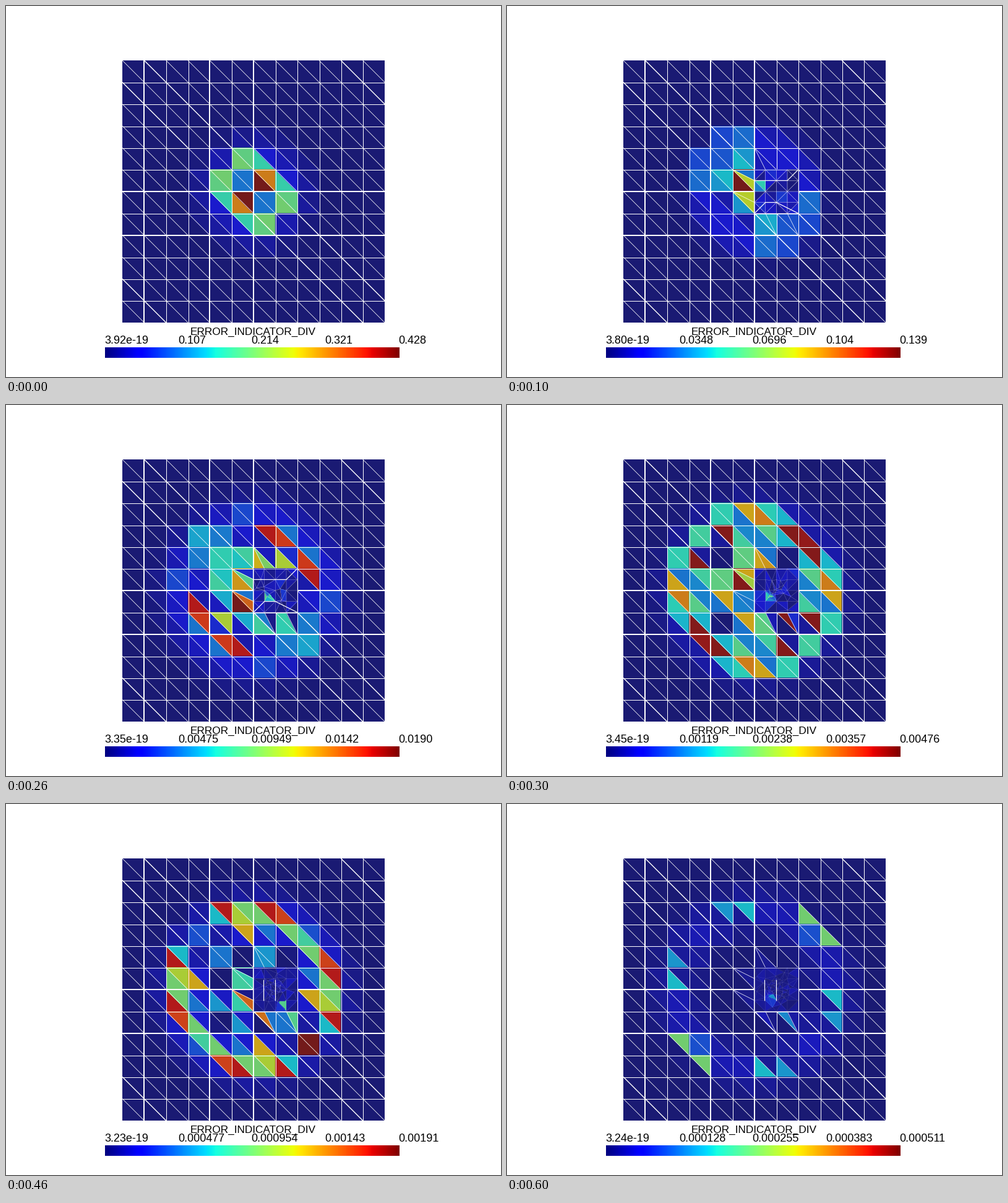
A matplotlib script that plays this animation: 800 by 600 pixels, repeating every 0.7 s.

```python
import numpy as np
import matplotlib.pyplot as plt
from matplotlib.animation import ArtistAnimation
from matplotlib.collections import LineCollection, PolyCollection
from matplotlib.tri import Triangulation

N, X0, Y0, CELL = 12, 188, 88, 424 / 12
JET = plt.get_cmap("jet")

fig = plt.figure(figsize=(8, 6), dpi=100, facecolor="white")
ax = fig.add_axes([0, 0, 1, 1])


def px(points):
    """Mesh units (column, row) to stage pixels."""
    return np.asarray(points, float) * CELL + (X0, Y0)


def faces(polys, percent, z):
    """Flat polygons in jet colours, dulled by the surface lighting."""
    rgb = 0.1 + 0.7 * JET(np.asarray(percent, float) / 100)[:, :3]
    return ax.add_collection(PolyCollection(
        [px(p) for p in polys], facecolors=rgb, edgecolors="none",
        antialiaseds=False, zorder=z))


def lines(segs, width, z, alpha=1):
    return ax.add_collection(LineCollection(
        segs, colors="white", linewidths=width * 0.72, alpha=alpha,
        capstyle="butt", zorder=z))


def label(x, y, text, size, **kw):
    return ax.text(x, y, text, fontsize=size * 0.72, family="Liberation Sans",
                   color="black", va="baseline", **kw)


def halves(x, y):
    """Lower left and upper right triangle of a cell."""
    return [[(x, y), (x, y + 1), (x + 1, y + 1)],
            [(x, y), (x + 1, y + 1), (x + 1, y)]]


CELLS = [t for r in range(N) for c in range(N) for t in halves(c, r)]
DIST = np.hypot(*(np.mean(CELLS, axis=1) - N / 2).T).reshape(N, N, 2)


def field(radius, width, level, peaks):
    """A ring of low error plus peaks repeated by the mesh symmetry."""
    grid = level * np.exp(-((DIST - radius) / width) ** 2)
    m = N - 1
    for (r, c), pair in peaks.items():
        for s, v in enumerate(np.broadcast_to(pair, 2)):
            grid[r, c, s] = grid[m - c, m - r, s] = v
            grid[m - r, m - c, 1 - s] = grid[c, r, 1 - s] = v
    return grid.ravel()


def fan(apex, start, mid, end):
    """A triangle split at the middle of one edge."""
    return [[apex, start, mid], [apex, mid, end]]


# Cells next to the refined block are halved where its edges are halved
FANS = (fan((6, 4), (6, 5), (6.5, 5), (7, 5))
        + fan((5, 5), (6, 5), (6, 5.5), (6, 6))
        + fan((5, 6), (6, 6), (6, 6.5), (6, 7))
        + fan((7, 8), (6, 7), (6.5, 7), (7, 7))
        + fan((8, 8), (7, 7), (7.5, 7), (8, 7)))
CORNER = [(8, 8), (9, 8), (9, 9), (8, 9)]
BORDER = px([(6, 5), (8, 5), (8, 7), (6, 7), (6, 5)])
RIDGES = [px([(6, 5.5), (7.5, 5.5), (8, 5)]),
          px([(6, 7), (6.5, 6.5), (7, 6.5), (8, 7)])]
POSTS = [px([(x, 5.55), (x, 6.5)]) for x in (6.45, 7)]


def block(extra, top, hot):
    """Refined centre: a lattice with extra nodes and one hot spot."""
    rng = np.random.default_rng(extra)
    t = np.linspace(0, 2, 5)
    nodes = [(6 + a, 5 + b) for a in t for b in t]
    core = rng.normal((6.95, 5.95), 0.35, (extra, 2))
    pts = np.vstack([nodes, core.clip((6.1, 5.1), (7.9, 6.9))])
    polys = pts[Triangulation(*pts.T).triangles]
    x, y, peak = hot
    mid = polys.mean(axis=1)
    near = np.exp(-((mid[:, 0] - x) ** 2 + (mid[:, 1] - y) ** 2) / 0.03)
    return polys, 1 + top * rng.random(len(polys)) ** 1.5 + peak * near


shots = []


def shot(low, high, ring, peaks, sides=None, mesh=None, strokes=()):
    art = [faces(CELLS, field(*ring, peaks), 1)]
    if sides:
        art.append(faces(FANS + [CORNER], sides, 2))
        art.append(lines([px([p[0], p[2]]) for p in FANS[::2]], 0.7, 4))
    if mesh:
        polys, values = block(*mesh)
        art.append(faces(polys, values, 5))
        loops = [px([*p, p[0]]) for p in polys]
        art.append(lines(loops, 0.4, 6, 6 / (10 + mesh[0])))
        art.append(lines([BORDER], 0.6, 7))
        art.append(lines(strokes, 1.2, 8))
    texts = [low] + [f"{high * k / 4:#.3g}" for k in range(1, 5)]
    for k, text in enumerate(texts):
        art.append(label(159 + 118.8 * k, 546.5, text, 18))
    shots.append(art)


# Fixed parts: wire grid, title, colour bar
for k in range(1, N):
    for wide, axis, origin in ((k in (1, 4, 6), 0, X0), (k in (6, 8), 1, Y0)):
        at = origin + k * CELL
        at = round(at) if wide else np.floor(at) + 0.5
        ends = [(at, Y0), (at, 512)] if axis == 0 else [(X0, at), (612, at)]
        lines([ends], 2 if wide else 1, 3)
for r in range(N):
    for c in range(N):
        bold = abs(c - r) == 10 or abs(c - r) == 1 and abs(r - 5) > 1
        lines([px([(c, r), (c + 1, r + 1)])], 1.4 if bold else 0.75, 3)
label(399, 531.5, "ERROR_INDICATOR_DIV", 17.3, ha="center")
ax.imshow(np.linspace(0, 1, 256)[None], cmap=JET, aspect="auto",
          extent=(160, 636, 569, 552), interpolation="nearest")
ax.set(xlim=(0, 800), ylim=(600, 0))
ax.axis("off")

# Peaks: (row, column) -> lower left and upper right percent, or both at once
shot("3.92e-19", 0.428, (1.9, 0.8, 8),
     {(4, 5): (50, 47), (4, 6): (40, 11), (5, 5): 25, (5, 6): (100, 76)})

shot("3.80e-19", 0.1391, (2.1, 0.9, 12),
     {(3, 4): 19, (3, 5): 24, (4, 4): 21, (4, 5): (35, 30),
      (5, 5): 100, (5, 6): 30},
     [8, 10, 25, 62, 62, 62, 33, 33, 20, 20, 3],
     (0, 16, (6.25, 5.75, 40)), RIDGES)

shot("3.35e-19", 0.01899, (3.1, 1.1, 13),
     {(2, 5): 19, (3, 3): 32, (3, 4): 26, (3, 6): (7, 92), (3, 7): (86, 25),
      (4, 4): 39, (4, 5): (36, 42), (4, 6): (33, 9), (4, 7): (60, 15),
      (5, 5): 72, (5, 6): 100},
     [68, 52, 15, 45, 25, 80, 26, 3, 40, 3, 32],
     (8, 16, (6.65, 6.3, 50)), RIDGES)

shot("3.45e-19", 0.00476, (3.6, 0.9, 8),
     {(2, 4): 39, (2, 5): (25, 70), (2, 6): (76, 38), (2, 7): (34, 7),
      (3, 3): 42, (3, 4): (5, 98), (3, 5): (42, 28), (3, 6): (27, 46),
      (3, 7): (34, 98), (3, 8): (96, 6), (4, 5): 47, (4, 6): (70, 25),
      (5, 5): 98, (5, 6): 27},
     [70, 72, 70, 58, 27, 26, 45, 8, 98, 15, 42],
     (18, 14, (6.65, 6.3, 55)))

shot("3.23e-19", 0.001908, (3.6, 0.9, 11),
     {(2, 4): (35, 92), (2, 5): (60, 50), (2, 6): (50, 92), (2, 7): (85, 10),
      (3, 3): 20, (3, 5): (12, 70), (3, 6): (12, 25), (3, 7): (12, 50),
      (3, 8): (42, 20), (4, 4): 25, (4, 6): (10, 30),
      (5, 5): 42, (5, 6): 40},
     [28, 30, 3, 40, 3, 80, 78, 25, 25, 45, 100],
     (34, 8, (7.4, 6.75, 45)), POSTS)

shot("3.54e-19", 0.0014935, (3.6, 1.1, 10),
     {(2, 4): (10, 45), (2, 5): (13, 62), (2, 6): (12, 28), (2, 7): (27, 15),
      (3, 4): 16, (3, 5): (3, 16), (3, 8): (50, 28)},
     [8, 9, 3, 5, 3, 40, 3, 5, 10, 4, 28],
     (48, 7, (6.4, 5.2, 40)), POSTS)

shot("3.24e-19", 0.0005108, (3.6, 1, 8),
     {(2, 4): (5, 30), (2, 5): (4, 35), (2, 8): (50, 1), (3, 8): 20},
     [3, 4, 3, 4, 3, 4, 8, 3, 28, 6, 9],
     (56, 6, (6.75, 6.4, 36)), POSTS)

anim = ArtistAnimation(fig, shots, interval=100, repeat=True, repeat_delay=0)
plt.show()
```
